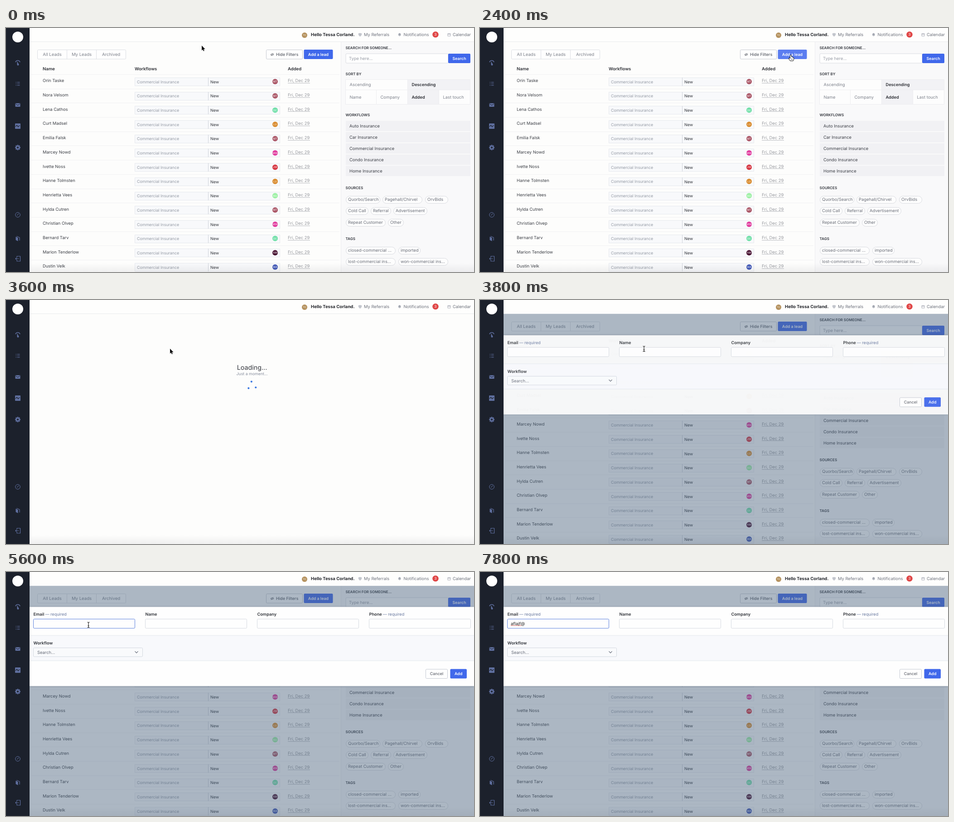
Animation of 1033x542 px, one loop 8 s. Source, as an HTML page with a canvas:

```html
<!DOCTYPE html>
<html lang="en">
<head>
<meta charset="utf-8">
<title>Adding a lead</title>
<style>
html, body { margin: 0; width: 100%; height: 100%; overflow: hidden; background: #fdfdfc; }
canvas { display: block; }
</style>
</head>
<body>
<canvas id="stage" width="1033" height="542"></canvas>
<script>
const ctx = document.getElementById('stage').getContext('2d');
const LOOP = 8000, STEP = 200;
const LOADING_AT = 3200, MODAL_AT = 3650, FOCUS_AT = 5200, TYPING_AT = 6000;
const BLUE = '#4068eb', INK = '#3b3e45', GREY = '#7d818b', ICON = '#5f6f9f';
const TYPED = 'aflajf@';

const people = ['Orin Taske', 'Nora Velsom', 'Lena Cathos', 'Curt Madsel', 'Emilia Falsk', 'Marcey Nowd',
  'Ivette Noss', 'Hanne Tolmsten', 'Henrietta Vees', 'Hylda Cutren', 'Christian Olvep', 'Bernard Tarv',
  'Marion Tenderlow', 'Dustin Velk'];
const owners = 'MT MT DC LU MT MW JW LU BG MT MW DC AM WA'.split(' ');
const ownerColors = { MT: '#ab5767', DC: '#70dfa8', LU: '#d98b2e', MW: '#e0379c', JW: '#d63540',
  BG: '#9bf0a3', AM: '#481231', WA: '#4259b8' };
const pills = [
  ['Quorbo/Search', 750, 381, 76], ['Pagehall/Chirvel', 831, 381, 88], ['OrvBids', 925, 381, 51],
  ['Cold Call', 750, 406, 50], ['Referral', 805, 406, 45], ['Advertisement', 855, 406, 75],
  ['Repeat Customer', 750, 432, 88], ['Other', 843, 432, 35],
  ['closed-commercial ...', 750, 494, 110], ['imported', 866, 494, 49],
  ['lost-commercial ins...', 750, 519, 110], ['won-commercial ins...', 866, 519, 110]];

// Pointer stops: time, x, y
const stops = [[0, 432, 39], [1300, 704, 58], [2000, 704, 58], [2400, 686, 60], [2700, 686, 60],
  [3500, 362, 108], [4200, 362, 108], [5200, 182, 117], [LOOP, 182, 117]];

function text(s, x, y, { size = 9.4, color = INK, weight = 400, align = 'left' } = {}) {
  ctx.font = `${weight} ${size}px Inter, sans-serif`;
  ctx.textAlign = align;
  ctx.fillStyle = color;
  ctx.fillText(s, x, y + size * .36);
}

function rect(x, y, w, h, fill, line, radius = 0) {
  ctx.beginPath();
  ctx.roundRect(x, y, w, h, radius);
  paint(fill, line);
}

function circle(x, y, r, fill, line) {
  ctx.beginPath();
  ctx.arc(x, y, r, 0, 7);
  paint(fill, line);
}

function paint(fill, line) {
  if (fill) { ctx.fillStyle = fill; ctx.fill(); }
  if (line) { ctx.strokeStyle = line; ctx.lineWidth = 1; ctx.stroke(); }
}

function shape(d, x, y, fill, line, width = 1) {
  const path = new Path2D(d);
  ctx.save();
  ctx.translate(x, y);
  ctx.lineWidth = width;
  ctx.lineJoin = 'round';
  if (line) { ctx.strokeStyle = line; ctx.stroke(path); }
  if (fill) { ctx.fillStyle = fill; ctx.fill(path); }
  ctx.restore();
}

function badge(label, x, y, r, color) {
  circle(x, y, r, color);
  text(label, x, y, { size: 6, color: '#fffc', weight: 500, align: 'center' });
}

function button(label, x, y, w, h, fill, line, color, weight = 600) {
  rect(x, y, w, h, fill, line, 2);
  text(label, x + w / 2, y + h / 2, { size: 8.9, color, weight, align: 'center' });
}

function sidebar() {
  rect(0, 0, 52, 542, '#1c212c');
  circle(26, 20, 12, '#fff');
  shape('M-5 0A5.2 5.2 0 0 1 5 0', 26, 76, null, ICON, 1.6);
  shape('M-1.5 -3L2 3A2 2 0 1 1 -1.5 4Z', 26, 77, ICON);
  shape('M-4.5 -3.5h1.5M-1.5 -3.5h6M-4.5 0h1.5M-1.5 0h6M-4.5 3.5h1.5M-1.5 3.5h6', 26, 124, null, ICON, 1.1);
  rect(20.5, 167, 11, 8, ICON, null, 1);
  shape('M-5 -3L0 .8L5 -3', 26, 171, null, '#1c212c');
  rect(20, 212, 12, 12, ICON, null, 1);
  shape('M-5 1L-2 -2L1 1.5L3 -1H5', 26, 218, null, '#1c212c', 1.2);
  for (let i = 0; i < 4; i++) {
    ctx.save();
    ctx.translate(26, 265.5);
    ctx.rotate(i * Math.PI / 4);
    rect(-1.3, -6, 2.6, 12, ICON);
    ctx.restore();
  }
  circle(26, 265.5, 4.4, ICON);
  circle(26, 265.5, 1.9, '#1c212c');
  circle(26, 415, 5.3, null, ICON);
  shape('M2 -3L0 0L-2 1', 26, 415, null, ICON);
  shape('M-4 -4L1 -1.5V6L-4 3.5Z', 25.5, 467.5, ICON);
  shape('M-2.5 -5L4 -2V4.5', 26, 467.5, null, ICON, 1.2);
  shape('M-2 -2.5V-5.5H5.5V5.5H-2V2.5M2 0H-5M-2.8 -2.2L-5 0L-2.8 2.2', 26, 512.5, null, ICON, 1.2);
}

function header() {
  rect(52, 0, 981, 30, '#fefefd');
  rect(52, 30, 981, 1, '#e9eaed');
  badge('TC', 659, 16, 6, '#b38f5a');
  text('Hello Tessa Corland.', 673, 15, { size: 9.6, weight: 700, color: '#25272d' });
  const soft = { color: '#6d717c' };
  shape('M-3 -3H3V0Q2 2.5 0 3.5Q-2 2.5 -3 0ZM-1.5 -1H1.5', 781.5, 15, '#c3c6cd', '#a5a9b3', .8);
  text('My Referrals', 790, 15, soft);
  shape('M-2.5 2V-1A2.3 2.3 0 0 1 2 -1V2ZM-1 3.4H1', 869, 14.5, '#a5a9b3', '#a5a9b3', .8);
  text('Notifications', 877.5, 15, soft);
  circle(948, 14.5, 6.8, '#e04747');
  text('3', 948, 14.5, { size: 8, color: '#fff', align: 'center' });
  shape('M-3 -2.5H3V3H-3ZM-3 -.8H3M-1.5 -3.5V-2M1.5 -3.5V-2', 978, 15, null, '#a5a9b3', .9);
  text('Calendar', 986, 15, soft);
}

function leadList(hover) {
  rect(69.5, 48.5, 195, 20.5, '#fefefe', '#dcdee3', 2);
  rect(134, 48.5, 1, 20.5, '#dcdee3');
  rect(199, 48.5, 1, 20.5, '#dcdee3');
  ['All Leads', 'My Leads', 'Archived'].forEach((s, i) =>
    text(s, 102 + i * 65, 59, { size: 9.6, color: GREY, align: 'center' }));
  rect(574.5, 48.5, 80, 20.5, '#fefefe', '#c6c9d0', 2);
  shape('M-3.5 0Q0 -3.5 3.5 0Q0 3.5 -3.5 0ZM-2.5 3L2.5 -3', 587.5, 59, null, '#5b5f68', 1);
  text('Hide Filters', 596, 59, { size: 9.1, weight: 500, color: '#5b5f68' });
  button('Add a lead', 657.5, 48, 64, 21, hover ? '#5b7df0' : BLUE, null, '#fff');

  const bold = { size: 9.5, weight: 600, color: '#2c2e34' };
  text('Name', 81, 90.5, bold);
  text('Workflows', 284, 90.5, bold);
  text('Added', 622, 90.5, bold);
  people.forEach((name, i) => {
    const y = 117 + i * 31.69;
    rect(56, Math.round(y - 14), 680, 1, '#f1f1f3');
    text(name, 81, y);
    rect(284.5, Math.round(y - 7) + .5, 320, 18, '#f8f9fb', '#e6e9ee');
    rect(446, Math.round(y - 7), 1, 19, '#cfd3da');
    text('Commercial Insurance', 289, y + 2.5, { size: 8.8, color: '#9298a3' });
    text('New', 451, y + 2.5, { size: 8.9, color: '#2f3238' });
    badge(owners[i], 594, y + 2, 6, ownerColors[owners[i]]);
    text('Fri, Dec 29', 622, y, { color: '#97999f' });
    rect(622, Math.round(y + 5), 49, 1, '#b9bbc0');
  });
}

function filters() {
  rect(740, 31, 293, 511, '#f9f9fa');
  rect(739, 31, 1, 511, '#ececef');
  const titles = { 'SEARCH FOR SOMEONE...': 44.5, 'SORT BY': 102, WORKFLOWS: 193.5, SOURCES: 355, TAGS: 468 };
  for (const s in titles) text(s, 749.5, titles[s], { size: 8.05, weight: 600, color: '#33363d' });

  rect(750, 57, 226, 21, '#fefefe', '#d9dbe1', 2);
  text('Type here...', 757, 67.5, { color: '#989ca5' });
  button('Search', 976, 57, 49, 21, BLUE, null, '#fff');

  const cells = [['Ascending', 750, 114, 137, 23], ['Descending', 887, 114, 138, 23, 1], ['Name', 750, 137, 68, 32],
    ['Company', 818, 137, 69, 32], ['Added', 887, 137, 69, 32, 1], ['Last touch', 956, 137, 69, 32]];
  for (const [s, x, y, w, h, on] of cells) {
    rect(x - .5, y + .5, w, h, on ? '#f2f2f5' : '#fdfdfd', '#ededf0');
    text(s, x + 8.5, y + h / 2 + .5, on ? { size: 9.2, weight: 600, color: '#2c2e34' } : { color: GREY });
  }
  ['Auto', 'Car', 'Commercial', 'Condo', 'Home'].forEach((s, i) => {
    rect(750, 206 + i * 25, 275, 23, '#f1f1f4');
    text(s + ' Insurance', 758, 217.5 + i * 25);
  });
  for (const [s, x, y, w] of pills) {
    rect(x + .5, y - 7.5, w - 1, 16, '#fdfdfd', '#d9dbe0', 8);
    text(s, x + 5, y, { color: '#6b6f79' });
  }
}

function loading(t) {
  text('Loading...', 543, 149.5, { size: 14.3, color: '#33363d', align: 'center' });
  text('Just a moment...', 543, 163.5, { size: 8.8, color: '#858c9c', align: 'center' });
  for (let i = 0; i < 3; i++) {
    const a = (-96 + i * 120) * Math.PI / 180 + (t - 3600) / 1000 * 2 * Math.PI;
    circle(542.8 + 9.2 * Math.cos(a), 190.5 + 9.2 * Math.sin(a), 2.1, '#3b78e2');
  }
}

function modal(t) {
  const shown = 1 - (1 - Math.min(1, (t - MODAL_AT) / 250)) ** 3;
  rect(52, 31, 981, 511, 'rgba(73,98,124,.45)');
  ctx.save();
  ctx.globalAlpha = shown;
  ctx.translate(0, (1 - shown) * 13);
  ctx.shadowColor = 'rgba(30,45,65,.35)';
  ctx.shadowBlur = 4;
  rect(52, 77.5, 981, 176, '#fefefe');
  ctx.shadowColor = 'transparent';
  rect(52, 141, 981, 56, '#f8f9fc');
  rect(52, 140.5, 981, 1, '#e4e8ee');
  rect(52, 196.5, 981, 1, '#e4e8ee');

  const label = { size: 9.2, weight: 600, color: '#2f3238' };
  ['Email', 'Name', 'Company', 'Phone'].forEach((s, i) => {
    const x = 60.5 + i * 247;
    const focused = i === 0 && t >= FOCUS_AT;
    text(s, x, 93.5, label);
    const end = x + ctx.measureText(s).width;
    if (i % 3 === 0) text('— required', end + 2, 93.5, { size: 9.1, color: '#68789f' });
    rect(x, 104.5, 224, 20.5, '#fefefe', focused ? '#5b80dc' : '#d6dae1', 2);
  });
  text('Workflow', 60.5, 157.5, label);
  rect(60.5, 168.5, 241, 19.5, '#f9fafc', '#d3d8e0', 2);
  text('Search...', 69, 178.5, { color: '#666b77' });
  shape('M-3.5 -1.8L0 1.8L3.5 -1.8', 288, 178, null, '#646a78', 1.2);
  button('Cancel', 926.5, 216, 48, 20.5, '#fefefe', '#c6cad3', '#62666f', 500);
  button('Add', 980.5, 215.5, 36.5, 21, BLUE, null, '#fff');

  const count = Math.max(0, Math.floor((t - TYPING_AT) / 250));
  text(TYPED.slice(0, count), 68, 114.5, { color: '#222' });
  if (count >= TYPED.length) {
    const width = ctx.measureText(TYPED.slice(0, -1)).width;
    for (let x = 0; x < width; x += 2) rect(68 + x, 118.5, 1.2, 1.2, '#e0453f');
  }
  ctx.restore();
}

function pointerAt(t) {
  const i = stops.findIndex(s => s[0] > t);
  const [t0, x0, y0] = stops[i - 1], [t1, x1, y1] = stops[i];
  const p = (t - t0) / (t1 - t0), e = p * p * (3 - 2 * p);
  return [x0 + (x1 - x0) * e, y0 + (y1 - y0) * e];
}

function pointer(x, y, kind) {
  if (kind === 'beam') {
    const d = 'M-2.5 -6Q0 -6 0 -4.5Q0 -6 2.5 -6M0 -4.5V4.5M-2.5 6Q0 6 0 4.5Q0 6 2.5 6M-1.5 2H1.5';
    shape(d, x, y + .5, null, '#fff', 2.4);
    shape(d, x, y + .5, null, '#111', 1.1);
  } else if (kind === 'hand') {
    shape('M-1 1Q0 -.5 1 1V4.5Q3 4 3.3 5Q5 5 5 6Q6.3 6 6.3 7.5V9L5 12.5H-1L-4 8.5Q-4.5 6.5 -3 7L-1 8.5Z', x, y, '#fff', '#111', 1.8);
    shape('M1.5 8V10.5M3.4 8V10.5', x, y, null, '#111', .7);
  } else {
    shape('M0 0V11L2.4 8.8L4 12.4L5.8 11.6L4.3 8.1H7.6Z', x, y, '#111', '#fff', 1.6);
  }
}

function draw(t) {
  const [x, y] = pointerAt(t);
  const modalOpen = t >= MODAL_AT, isLoading = t >= LOADING_AT && !modalOpen;
  const hover = t > 2000 && t < LOADING_AT && x > 657;
  const overField = modalOpen && (x - 60.5) % 247 < 224;

  rect(0, 0, 1033, 542, '#fdfdfc');
  if (isLoading) loading(t);
  else {
    leadList(hover);
    filters();
  }
  const fade = ctx.createLinearGradient(0, 522, 0, 542);
  fade.addColorStop(0, 'rgba(60,60,70,0)');
  fade.addColorStop(1, 'rgba(60,60,70,.07)');
  rect(52, 522, 981, 20, fade);
  if (modalOpen) modal(t);
  header();
  sidebar();
  if (t < TYPING_AT + 250) pointer(x, y, overField ? 'beam' : hover ? 'hand' : 'arrow');
}

ctx.textRendering = 'geometricPrecision';
const start = performance.now();
function tick() {
  const t = (performance.now() - start) % LOOP;
  draw(Math.floor(t / STEP) * STEP);
  requestAnimationFrame(tick);
}
tick();
</script>
</body>
</html>
```
